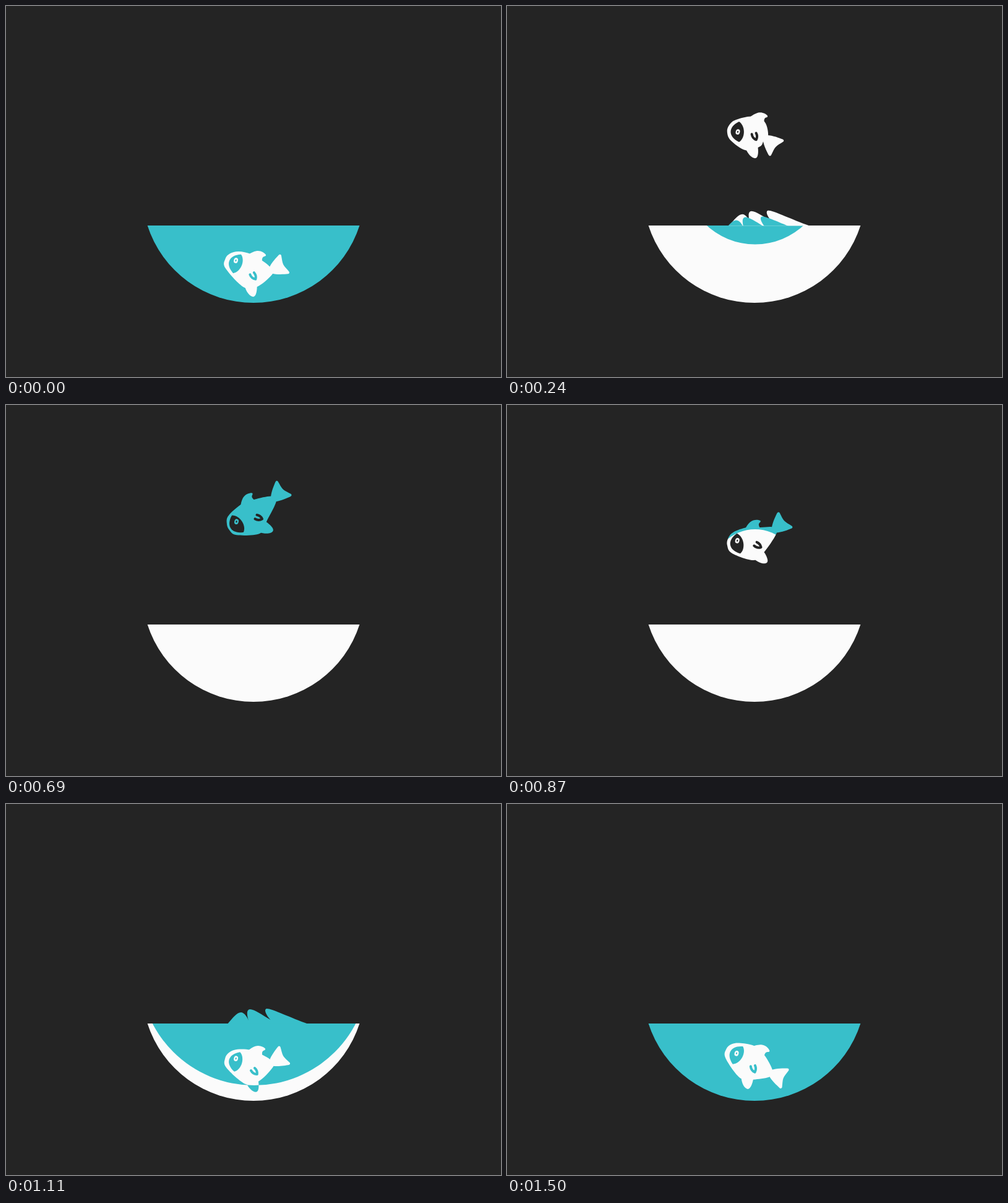
Animation of 800x600 px, one loop 1530 ms. Source, as an HTML page:

```html
<!DOCTYPE html>
<html lang="en">
<head>
<meta charset="utf-8">
<title>Jumping fish</title>
<style>
  html, body { margin: 0; width: 100%; height: 100%; overflow: hidden; background: #242424; }
  svg { display: block; width: 800px; height: 600px; }
  .white { fill: #fbfbfb; }
  .teal { fill: #38bfca; }
</style>
</head>
<body>
<svg viewBox="0 0 800 600">
  <defs>
    <mask id="bowl" maskUnits="userSpaceOnUse" x="0" y="0" width="800" height="600">
      <path fill="#fff" d="M228.6 355A180 180 0 0 0 571.4 355Z"/>
    </mask>
    <clipPath id="air"><rect width="800" height="355.4"/></clipPath>
    <clipPath id="spot"><circle class="spot" cx="401" cy="270"/></clipPath>
    <path id="wave" d="M374 364L382 355C389 347 396 338 402 338S413 346 416 355
      C412 346 410 333 417 333S436 342 450 350C444 344 438 333 444 332S474 343 506 355L530 364Z"/>
    <mask id="fish" maskUnits="userSpaceOnUse" x="0" y="0" width="800" height="600">
      <g id="swimmer" fill="#fff">
        <path id="body"/>
        <path class="part" d="M-25-5C-18-11-7-15-2-17Q1-18 1.5-15C0-9-2-4-2 0S0 9 1.5 15Q1 18-2 17C-7 15-18 11-25 5Z"/>
        <path class="part" d="M-5-10C4-10 16.5-7 16.5-2S8 9-3 10Z"/>
        <path class="part" d="M-3 3Q4-3 10-5C17-7 23-4 26-1Q27 1 24 2Q20 3 21 10L10 16Z"/>
        <path class="part" fill="#000" d="M-16.5 0C-10-10.5 10-10.5 16.5 0C8 18-8 18-16.5 0Z"/>
        <path class="part" fill="none" stroke="#000" stroke-width="4" stroke-linecap="round" stroke-linejoin="round" d="M-6 1.5Q0 5 5.5 1.5Q3-4-3-5"/>
        <g id="eye">
          <ellipse rx="3.4" ry="4.4"/>
          <ellipse rx="1.1" ry="1.6" fill="#000"/>
        </g>
      </g>
    </mask>
  </defs>

  <g mask="url(#bowl)">
    <rect class="white" width="800" height="600"/>
    <circle class="spot teal" cx="401" cy="270"/>
  </g>
  <g clip-path="url(#air)">
    <use id="backWave" class="white" href="#wave"/>
    <g clip-path="url(#spot)"><use id="frontWave" class="teal" href="#wave"/></g>
  </g>
  <g mask="url(#fish)">
    <rect class="teal" width="800" height="600"/>
    <circle class="spot white" cx="401" cy="270"/>
  </g>
</svg>
<script>
const LOOP = 1530;
const $ = id => document.getElementById(id);
const parts = document.querySelectorAll('.part');
const spots = document.querySelectorAll('.spot');

// Each pose: time, eye height, then x, y, angle of tail, belly fin, back fin, cheek, side fin
const poses = [
  [0, 411.5, 450, 417, -26, 396, 454, 83, 394, 400, 7, 373.5, 417, 113, 400, 437, 39],
  [240, 204, 435.5, 230, 42, 396, 231, 76, 395, 178, 2, 375, 204, 90, 400.5, 211.5, 52],
  [480, 188, 445.5, 191, 34, 408, 199, 43, 384, 151, -21, 375.5, 188.5, 64, 404.5, 179, 18],
  [690, 188, 449, 134, -46, 416, 197, 28, 379, 160, -43, 374.5, 191.5, 55, 408.5, 182, 0],
  [1020, 324, 450, 307.5, -40, 401, 361, 67, 391, 308, -7, 374, 329.5, 101, 403, 343.5, 23],
  [1260, 403, 449.5, 416, -16, 394, 444, 86, 396, 390, 9, 373, 408, 115, 400, 427, 45],
  [1500, 403, 448.5, 445, 23, 388, 444, 95, 400, 390, 22, 373, 406, 120, 398.5, 428, 55],
];
poses.push([LOOP, ...poses[0].slice(1)]);

function poseAt(t) {
  const i = poses.findIndex(p => p[0] > t);
  const from = poses[i - 1], to = poses[i];
  const k = (t - from[0]) / (to[0] - from[0]);
  return from.map((v, j) => v + (to[j] - v) * k);
}

// Point given in the local frame of a part
function place([x, y, angle], dx, dy) {
  const a = angle * Math.PI / 180, c = Math.cos(a), s = Math.sin(a);
  return [x + dx * c - dy * s, y + dx * s + dy * c];
}

// Closed Catmull-Rom curve
function smooth(pts) {
  const n = pts.length, at = i => pts[(i + n) % n];
  let d = 'M' + pts[0];
  for (let i = 0; i < n; i++) {
    const [a, b, c, e] = [at(i - 1), at(i), at(i + 1), at(i + 2)];
    const c1 = b.map((v, k) => v + (c[k] - a[k]) / 6);
    const c2 = c.map((v, k) => v - (e[k] - b[k]) / 6);
    d += `C${c1} ${c2} ${c}`;
  }
  return d + 'Z';
}

// The body is stretched between the cheek and the roots of the fins
function outline([tail, belly, back, cheek]) {
  const bulge = 0.68 + 0.0034 * cheek[2];
  const head = (dx, dy) => place(cheek, dx, dy * bulge);
  return smooth([
    head(14, 13.5), head(0, 19.5), head(-11, 16), head(-19.5, 5),
    place(back, 2, 1), place(back, 22, 9.5),
    place(tail, -23, -5.5), place(tail, -23, 5.5),
    place(belly, 0, -13), place(belly, 0, 11),
  ]);
}

// Height of the fish's eye: leap, hang, fall, bob in the water
function fishY(t) {
  if (t < 40) return 411.5 + 3.5 * t / 40;
  if (t < 385) return 187 + 228 * (1 - (t - 40) / 345) ** 3;
  if (t < 528) return 187;
  if (t < 1080) return 187 + 137 * ((t - 528) / 492) ** 4;
  if (t < 1500) {
    const u = t - 1080;
    return 403 + Math.exp(-u / 30) + 22 * Math.sin(Math.PI * u / 180) * Math.exp(-u / 100);
  }
  return 403 + 8.5 * (t - 1500) / 30;
}

const spotRadius = t => Math.max(0, 0.483 * (t < 600 ? 480 - t : t - 728));

// Waves swell quickly, drift right and sink
function moveWave(el, age) {
  const visible = age > 0 && age < 480;
  el.style.display = visible ? '' : 'none';
  if (!visible) return;
  const swell = age < 150 ? 1 - age / 150 : (age - 150) / 320;
  el.setAttribute('transform', `translate(${0.146 * age - 38} ${27 * swell ** 2.7 - 2})`);
}

function draw(t) {
  const [, eyeY, ...values] = poseAt(t);
  const frames = [...parts].map((_, i) => values.slice(3 * i, 3 * i + 3));
  $('body').setAttribute('d', outline(frames));
  parts.forEach((part, i) => {
    const [x, y, angle] = frames[i];
    part.setAttribute('transform', `translate(${x} ${y}) rotate(${angle})`);
  });
  $('eye').setAttribute('transform', `translate(${frames[3][0] - 2} ${eyeY}) rotate(15)`);
  $('swimmer').setAttribute('transform', `translate(0 ${fishY(t) - eyeY})`);

  spots.forEach(c => c.setAttribute('r', spotRadius(t)));
  const splash = t > 1000;
  moveWave($('backWave'), splash ? 0 : t - 130);
  moveWave($('frontWave'), t - (splash ? 1005 : 197));
}

const start = performance.now();
function tick() {
  draw((performance.now() - start) % LOOP);
  requestAnimationFrame(tick);
}
tick();
</script>
</body>
</html>
```
